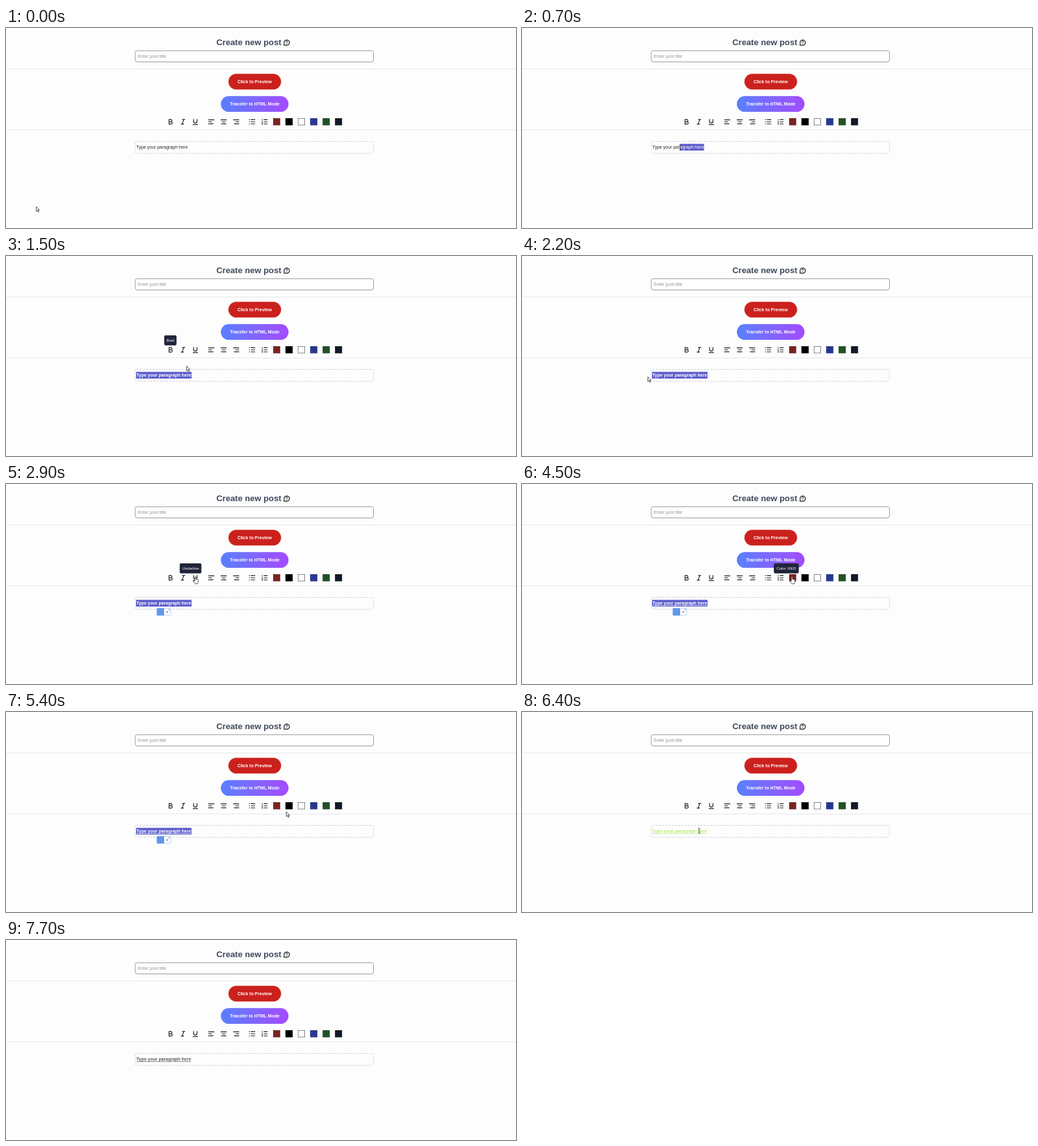
Write an HTML page that moves like this. It is 800 px wide and 315 px high and loops after 8.3 s.

```html
<!DOCTYPE html>
<html lang="en">
<head>
<meta charset="utf-8">
<title>Post editor</title>
<style>
html, body { margin: 0; width: 100%; height: 100%; overflow: hidden; background: #fdfdfe; }
svg { display: block; width: 800px; height: 315px; font: 7px "Liberation Sans", Arial, sans-serif; }
.bold { font-weight: bold; }
.line { fill: none; stroke: #1c1c1e; stroke-width: 1.15; }
</style>
</head>
<body>
<svg viewBox="0 0 800 315">
  <defs>
    <linearGradient id="violet"><stop stop-color="#5a80ff"/><stop offset="1" stop-color="#a44bff"/></linearGradient>
    <clipPath id="clip"><rect id="range" y="182.3" height="10.8"/></clipPath>
  </defs>
  <rect width="800" height="315" fill="#fdfdfe"/>
  <path d="M0 64.5H800M0 160.5H800" stroke="#e7e7ea"/>

  <text class="bold" x="330" y="27.3" font-size="13.2" fill="#3f485a">Create new post</text>
  <g class="line" stroke-linecap="round">
    <path d="M436.2 27.2V22.6A4.2 4.2 0 1 1 440.4 27.2Z" stroke-width="1.2"/>
    <path d="M439 21.6a1.4 1.3 0 1 1 2.1 1.1q-.6.4-.6 1M440.5 25.2v.1" stroke-width="1"/>
  </g>
  <rect x="202.8" y="35.8" width="373.7" height="17.6" rx="3" fill="#fff" stroke="#98989c"/>
  <text x="206.7" y="46.7" fill="#969699">Enter post title</text>

  <rect x="349" y="72.2" width="82.4" height="24.6" rx="12.3" fill="#cb211c" stroke="#dc4b47" stroke-width=".7" stroke-dasharray="1 1"/>
  <text class="bold" x="390" y="86.9" text-anchor="middle" fill="#fff">Click to Preview</text>
  <rect x="337" y="107.3" width="106.2" height="24.7" rx="12.3" fill="url(#violet)"/>
  <text class="bold" x="390.2" y="122" text-anchor="middle" fill="#fff">Transfer to HTML Mode</text>

  <g class="line">
    <path d="M255.8 144.1h2.7a1.75 1.75 0 0 1 0 3.5h-2.7zm0 3.5h3.2a1.9 1.9 0 0 1 0 3.8h-3.2z"/>
    <path d="M276.3 144.1h4.6M274.3 151.4h4.6M278.8 144.1l-2.4 7.3"/>
    <path d="M294.2 143.5v3.4a2.7 2.7 0 0 0 5.4 0v-3.4M293 152.1h8"/>
    <path d="M317.3 144.6h9.4m-9.4 3.1h5.8m-5.8 3.1h8"/>
    <path d="M336.8 144.6h9.4m-7.6 3.1h5.8m-6.9 3.1h8"/>
    <path d="M356.3 144.6h9.4m-5.8 3.1h5.8m-8 3.1h8"/>
    <path d="M384 144.4h6.8M384 147.7h6.8M384 151h6.8M381 144.4h1.4m-1.4 3.3h1.4m-1.4 3.3h1.4"/>
    <path d="M404.4 144.4h5.8m-5.8 3.3h5.8m-5.8 3.3h5.8"/>
    <path d="M401.2 143.6h.9v2.2m-1.1 1h1.5l-1.4 1.8h1.5m-1.6 1.2h1.5v2.2h-1.5m.4-1.1h1" stroke-width=".65"/>
  </g>
  <g id="swatches"></g>

  <rect x="203" y="178.6" width="373.4" height="18.7" rx="2" fill="none" stroke="#cfcfd1" stroke-dasharray="3 2"/>
  <text class="para" x="204.5" y="190.1">Type your paragraph here</text>
  <g clip-path="url(#clip)">
    <rect x="204" y="182.3" width="88" height="10.8" fill="#5b5dca"/>
    <text class="para" x="204.5" y="190.1" fill="#fff">Type your paragraph here</text>
  </g>

  <g id="popup">
    <rect x="236.9" y="195.9" width="21.6" height="10.9" rx="1" fill="#fff" stroke="#a9c6f0" stroke-width=".8"/>
    <rect x="236.6" y="195.6" width="11.4" height="11.5" fill="#5f97ee"/>
    <path d="M251 200.8h4l-2 2.2z" fill="#6d7280"/>
    <circle cx="256.2" cy="197.8" r="1" fill="#858a94"/>
  </g>
  <g id="tip">
    <rect y="125" height="15.8" rx="2" fill="#20243a"/>
    <text y="135" font-size="6.1" text-anchor="middle" fill="#fff"></text>
  </g>
  <g id="pointer" stroke="#26262b" stroke-width=".8" stroke-linejoin="round">
    <path id="arrow" fill="#fff" d="M.4.4V7.7L2.1 6.2 3.4 9.1 4.6 8.5 3.3 5.7H5.5Z"/>
    <path id="hand" fill="#fff" d="M-.8 6.7V.8a.9.9 0 0 1 1.8 0V4l3 .7q1 .3.8 1.4l-.6 3.1-.7 1.9H-.1L-3.1 7.4q.5-1.3 2.3-.7Z"/>
    <path id="beam" fill="none" d="M-1.6-3.8Q0-3.8 0-3Q0-3.8 1.6-3.8M0-3V3.4M-1.6 4.2Q0 4.2 0 3.4Q0 4.2 1.6 4.2"/>
  </g>
</svg>
<script>
const LOOP = 8300, STEP = 100;
const $ = id => document.getElementById(id);
const show = (el, on) => el.setAttribute("visibility", on ? "inherit" : "hidden");
const set = (el, attrs) => { for (const k in attrs) el.setAttribute(k, attrs[k]); };

const swatchX = i => 424.6 + i * 19.4;
$("swatches").innerHTML = ["#78231f", "#000", "#fff", "#27378f", "#225126", "#111827"].map((fill, i) =>
  `<rect x="${swatchX(i) - 5.2}" y="142.5" width="10.4" height="10.4" fill="${fill}" stroke="${i === 2 ? "#66666a" : fill}" stroke-width=".8"/>`
).join("");
const buttons = [258, 277.5, 297, 322, 341.5, 361, 386, 405.5, ...[0, 1, 2, 3, 4, 5].map(swatchX)];

// pointer path: time, x, y
const path = [
  [0, 47, 281], [500, 290, 188], [900, 206, 188], [1300, 258, 146], [1400, 258, 146],
  [1500, 283, 173], [1700, 291, 188], [2200, 197, 190], [2400, 204, 189], [2800, 297, 146],
  [3300, 297, 146], [3700, 215, 167], [3900, 201, 188], [4200, 291, 188], [4500, 423.5, 146],
  [4600, 423.5, 146], [4900, 300, 225], [5000, 291, 188], [5200, 206, 188], [5500, 521, 146],
  [5700, 521, 146], [6000, 300, 226], [6400, 278, 187], [6500, 291, 188], [6800, 191, 189],
  [7100, 521, 146], [7300, 521, 146], [7500, 320, 240], [7700, 300, 291]
];
// selections: drag start, drag end, cleared
const drags = [[500, 900, 1700], [1700, 2200, 3900], [3900, 4200, 4900], [5000, 5200, 6000], [6500, 6800, 7500]];
const popups = [[1000, 1400], [2400, 3300], [4300, 4700], [5300, 5700], [6900, 7300]];
// tooltips: start, end, label, button centre, width
const tips = [
  [1300, 1600, "Bold", 258, 19.3], [2800, 3400, "Underline", 297, 34], [4500, 4700, "Color: RED", 424.6, 39],
  [5500, 5800, "Color: DARK", 521.6, 43], [7100, 7400, "Color: DARK", 521.6, 43]
];
const inks = [[0, "#2b2b2e"], [4600, "#78231f"], [5600, "#b8ee70"], [7200, "#5c5c60"]];

const active = (list, t) => list.find(([from, to]) => t >= from && t < to);

function pointerAt(t) {
  const i = path.findIndex(p => p[0] > t);
  if (i < 0) return path[path.length - 1].slice(1);
  const [t0, x0, y0] = path[i - 1], [t1, x1, y1] = path[i];
  const u = (t - t0) / (t1 - t0), e = u * u * (3 - 2 * u);
  return [x0 + (x1 - x0) * e, y0 + (y1 - y0) * e];
}

function drawPointer(t, x, y) {
  const hand = y > 140 && y < 155 && buttons.some(b => Math.abs(b - x) < 8);
  const beam = y > 179 && y < 197 && x > 203 && x < 576;
  set($("pointer"), { transform: `translate(${x} ${y})` });
  show($("pointer"), t < 7700);
  show($("hand"), hand);
  show($("beam"), beam);
  show($("arrow"), !hand && !beam);
}

function drawText(t, x) {
  const bold = t >= 1400, right = bold ? 291 : 285.5;
  const paras = document.querySelectorAll(".para");
  for (const p of paras) {
    set(p, { "font-weight": bold ? "bold" : "normal", "text-decoration": t >= 3200 ? "underline" : "none" });
  }
  paras[0].setAttribute("fill", inks.filter(c => c[0] <= t).pop()[1]);

  const drag = drags.find(d => t >= d[0] && t < d[2]);
  let from = 204, to = drag ? right : 204;
  if (drag && t < drag[1]) {
    const edge = Math.max(204, Math.min(right, x));
    if (pointerAt(drag[0])[0] > 250) from = edge;
    else to = edge;
  }
  set($("range"), { x: from, width: to - from });
}

function drawTip(t) {
  const tip = active(tips, t);
  show($("tip"), tip);
  if (!tip) return;
  const [, , label, cx, w] = tip, x = cx + 9.5 - w;
  const [box, text] = $("tip").children;
  set(box, { x, width: w });
  set(text, { x: x + w / 2 });
  text.textContent = label;
}

function draw(t) {
  const [x, y] = pointerAt(t);
  drawText(t, x);
  drawTip(t);
  show($("popup"), active(popups, t));
  drawPointer(t, x, y);
}

const start = performance.now();
function tick() {
  const t = (performance.now() - start) % LOOP;
  draw(Math.floor(t / STEP) * STEP);
  requestAnimationFrame(tick);
}
tick();
</script>
</body>
</html>
```
